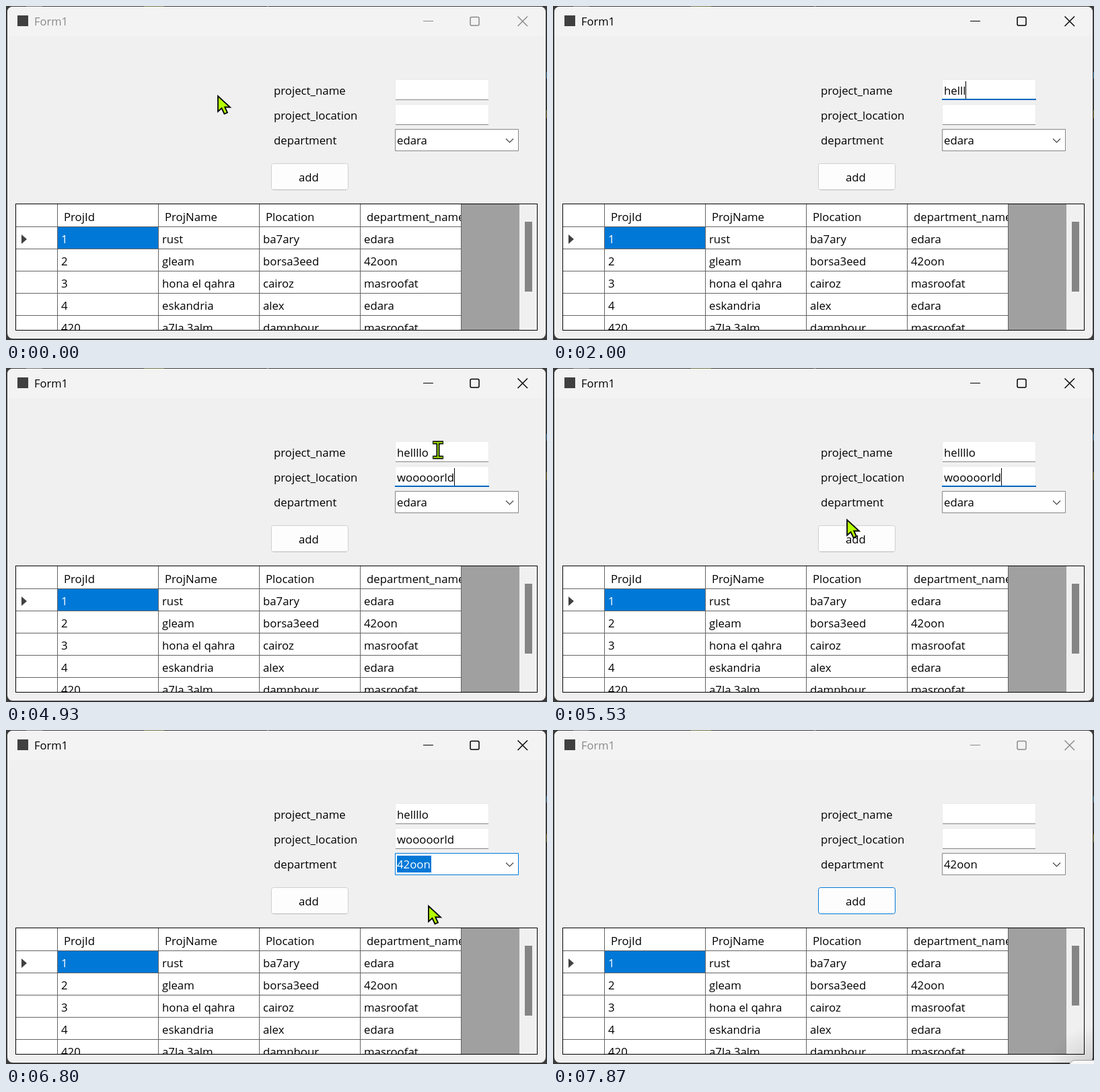
Animation, 804 px wide and 497 px high, one loop 8 s. Source, as an HTML page with a canvas:

```html
<!DOCTYPE html>
<html lang="en">
<head>
<meta charset="utf-8">
<title>Form1</title>
<style>
html, body { margin: 0; width: 100%; height: 100%; overflow: hidden; background: #3c3c3c; }
canvas { display: block; }
</style>
</head>
<body>
<canvas id="stage" width="804" height="497"></canvas>
<script>
const c = document.getElementById('stage').getContext('2d');
const LOOP = 8000, TICK = 200 / 3; // the screen updates 15 times a second
const BLUE = '#0078d7';

// Tick at which each character of a field appears
const NAME = { text: 'hellllo', ticks: [22, 24, 26, 28, 30, 32, 35] };
const PLACE = { text: 'wooooorld', ticks: [43, 44, 47, 49, 51, 54, 56, 57, 59] };

// Pointer path: tick, x, y
const PATH = [
  [0, 315, 134], [2, 365, 143], [5, 535, 138], [8, 642, 122], [74, 642, 122],
  [77, 560, 190], [80, 432, 243], [82, 431, 240], [83, 437, 226], [86, 777, 216],
  [89, 749, 203], [91, 749, 203], [94, 664, 264], [97, 642, 272], [99, 628, 262],
  [102, 628, 262], [107, 457, 264], [111, 457, 264], [117, 815, 500]
];

const ROWS = [
  ['1', 'rust', 'ba7ary', 'edara'],
  ['2', 'gleam', 'borsa3eed', '42oon'],
  ['3', 'hona el qahra', 'cairoz', 'masroofat'],
  ['4', 'eskandria', 'alex', 'edara'],
  ['420', 'a7la 3alm', 'damnhour', 'masroofat']
];
const DEPARTMENTS = ['edara', '42oon', 'masroofat'];

function rect(x, y, w, h, fill) {
  c.fillStyle = fill;
  c.fillRect(x, y, w, h);
}

function box(x, y, w, h, r, fill, stroke) {
  c.beginPath();
  c.roundRect(x + .5, y + .5, w - 1, h - 1, r);
  c.fillStyle = fill;
  c.fill();
  c.lineWidth = 1;
  c.strokeStyle = stroke;
  c.stroke();
}

function line(points, color, width = 1) {
  c.beginPath();
  points.forEach(([x, y]) => c.lineTo(x, y));
  c.strokeStyle = color;
  c.lineWidth = width;
  c.stroke();
}

function text(s, x, y, color = '#000', size = 16.8) {
  c.font = size + 'px "Open Sans", "Noto Sans", sans-serif';
  c.fillStyle = color;
  c.fillText(s, x, y);
  return c.measureText(s).width;
}

function clipped(x, y, w, h, draw) {
  c.save();
  c.beginPath();
  c.rect(x, y, w, h);
  c.clip();
  draw();
  c.restore();
}

function pointer(n) {
  const i = PATH.findIndex(p => p[0] > n);
  if (i < 0) return PATH.at(-1).slice(1);
  const [n0, x0, y0] = PATH[i - 1], [n1, x1, y1] = PATH[i];
  const k = (n - n0) / (n1 - n0);
  return [x0 + (x1 - x0) * k, y0 + (y1 - y0) * k];
}

const inside = (p, x, y, w, h) => p[0] >= x && p[0] < x + w && p[1] >= y && p[1] < y + h;

function drawWindow(active) {
  rect(0, 0, 804, 497, '#3c3c3c');
  rect(205, 0, 30, 2, '#77774c');
  rect(30, 0, 24, 1, '#777');
  rect(388, 0, 2, 2, '#888');
  rect(803, 98, 1, 10, '#4d86b0');
  rect(803, 155, 1, 12, '#8a7a3c');
  c.beginPath();
  c.roundRect(2, 1, 800, 494, 8);
  c.fillStyle = '#f0f0f0';
  c.fill();
  c.beginPath();
  c.roundRect(2, 1, 800, 44, [8, 8, 0, 0]);
  c.fillStyle = '#f3f3f3';
  c.fill();

  const ink = active ? '#000' : '#8a8a8a';
  rect(17, 14, 16, 16, '#404040');
  text('Form1', 42, 29, ink, 16.5);
  line([[620, 22.5], [635, 22.5]], ink);
  c.beginPath();
  c.roundRect(690, 16.5, 13, 12.5, 2);
  c.lineWidth = 1.5;
  c.stroke();
  line([[760.5, 15.5], [775, 30]], ink, 1.4);
  line([[775, 15.5], [760.5, 30]], ink, 1.4);
}

function drawField(y, value, n, focused) {
  rect(578, y - 1, 140, 31, '#ebebeb');
  rect(579, y, 138, 29, '#fff');
  if (focused) rect(578, y + 28, 140, 2, '#0067c0');
  else rect(579, y + 29, 138, 1, '#868686');
  const shown = value.text.slice(0, value.ticks.filter(k => k <= n).length);
  const w = text(shown, 581, y + 22);
  if (focused) rect(Math.round(581 + w), y + 2, 1, 26, '#000');
}

function drawCombo(value, focused, hot, open) {
  box(578, 183, 184, 33, 0, '#fff', focused || hot ? BLUE : '#868686');
  if (hot || open) box(736, 183, 26, 33, 0, open ? '#cce4f7' : '#e0eef9', BLUE);
  if (focused) {
    const w = c.measureText(value).width;
    rect(581, 187, Math.round(w) + 1, 25, BLUE);
  }
  text(value, 581, 206, focused ? '#fff' : '#000');
  line([[743, 197.5], [748.5, 203], [754, 197.5]], '#444', 1.1);
}

function drawList(row) {
  rect(582, 221, 183, 75, 'rgba(0,0,0,.25)');
  rect(581, 220, 183, 75, 'rgba(0,0,0,.35)');
  box(578, 216, 184, 77, 0, '#fff', BLUE);
  DEPARTMENTS.forEach((d, i) => {
    const y = 217 + i * 25;
    if (i === row) rect(579, y, 182, 25, BLUE);
    text(d, 581, y + 20, i === row ? '#fff' : '#000');
  });
}

function drawButton(state) {
  const [fill, edge] = {
    normal: ['#fdfdfd', '#d0d0d0'],
    hover: ['#e0eef9', BLUE],
    pressed: ['#cce4f7', '#005499'],
    focus: ['#fdfdfd', BLUE]
  }[state];
  box(394, 234, 115, 40, 3, fill, edge);
  if (state === 'normal') line([[397, 273.5], [506, 273.5]], '#b8b8b8');
  if (state === 'pressed') {
    c.setLineDash([1, 1]);
    c.strokeStyle = '#000';
    c.strokeRect(396.5, 236.5, 110, 35);
    c.setLineDash([]);
  }
  text('add', 435, 261);
}

function drawGrid(thumb) {
  rect(14, 294, 776, 189, '#fff');
  clipped(15, 295, 774, 187, () => {
    rect(677, 295, 86, 187, '#a0a0a0');
    rect(763, 295, 26, 187, '#f0f0f0');
    rect(771, 321, 11, thumb, '#858585');
    rect(77, 329, 149, 32, BLUE);
    for (let i = 0; i < 5; i++) {
      rect(15, 328 + i * 33, 662, 1, '#646464');
      rect(76 + i * 150, 295, 1, 187, '#646464');
    }
    ['ProjId', 'ProjName', 'Plocation', 'department_name'].forEach((h, i) =>
      clipped(77 + i * 150, 295, 149, 33, () => text(h, 86 + i * 150, 320)));
    ROWS.forEach((row, r) => row.forEach((s, i) =>
      text(s, 82 + i * 150, 353 + r * 33, r + i ? '#000' : '#fff')));
    c.beginPath();
    c.moveTo(23, 340);
    c.lineTo(31, 347);
    c.lineTo(23, 354);
    c.fillStyle = '#404040';
    c.fill();
  });
  c.lineWidth = 1;
  c.strokeStyle = '#000';
  c.strokeRect(14.5, 294.5, 775, 188);
}

function drawPointer([x, y], beam) {
  c.save();
  c.translate(x, y);
  if (beam) {
    for (const [color, w, e] of [['#000', 5, 1], ['#b4ff00', 1.6, 0]]) {
      line([[-7 - e, -11], [7 + e, -11]], color, w);
      line([[-7 - e, 11], [7 + e, 11]], color, w);
      line([[0, -11], [0, 11]], color, w);
    }
  } else {
    c.beginPath();
    [[0, 0], [0, 23], [5.5, 18], [9.5, 26.5], [14, 24.5], [10.2, 16.5], [18, 16.5]]
      .forEach(p => c.lineTo(...p));
    c.closePath();
    c.fillStyle = '#b4ff00';
    c.fill();
    c.lineWidth = 1.8;
    c.strokeStyle = '#000';
    c.stroke();
  }
  c.restore();
}

// Corner of a dialog appearing over the form
function drawDialog() {
  const g = c.createRadialGradient(804, 510, 5, 804, 510, 70);
  g.addColorStop(0, 'rgba(0,0,0,.16)');
  g.addColorStop(1, 'rgba(0,0,0,0)');
  rect(730, 440, 74, 57, g);
  box(767, 491, 60, 30, 8, '#f8f8f8', '#999');
}

function draw(t) {
  const n = Math.floor((t + 3.4) / TICK);
  const p = pointer(n);
  const active = n >= 9 && n < 112;
  const cleared = n >= 112;
  const open = n >= 91 && n < 102;
  const overField = inside(p, 579, 110, 138, 30) || inside(p, 579, 147, 138, 30);
  const overButton = inside(p, 394, 234, 115, 40) && (n < 22 || n >= 74);

  let button = overButton && !open ? 'hover' : 'normal';
  if (n === 109) button = 'pressed';
  else if (n >= 112) button = 'focus';

  drawWindow(active);
  text('project_name', 398, 132);
  text('project_location', 398, 169);
  text('department', 398, 206);
  drawField(110, NAME, cleared ? 0 : n, active && n < 38);
  drawField(147, PLACE, cleared ? 0 : n, n >= 38 && n < 91);
  drawCombo(DEPARTMENTS[n < 102 ? 0 : 1], n >= 91 && n < 109,
    n >= 86 && n < 91 && inside(p, 736, 183, 26, 33), open);
  drawButton(button);
  drawGrid(cleared ? 89 : 104);
  if (open) drawList(Math.max(0, Math.min(2, Math.floor((p[1] - 217) / 25))));
  if (n >= 118) drawDialog();
  else if (n < 22 || n >= 74) drawPointer(p, overField);
}

let start;
function frame(now) {
  start ??= now;
  draw((now - start) % LOOP);
  requestAnimationFrame(frame);
}
requestAnimationFrame(frame);
</script>
</body>
</html>
```
